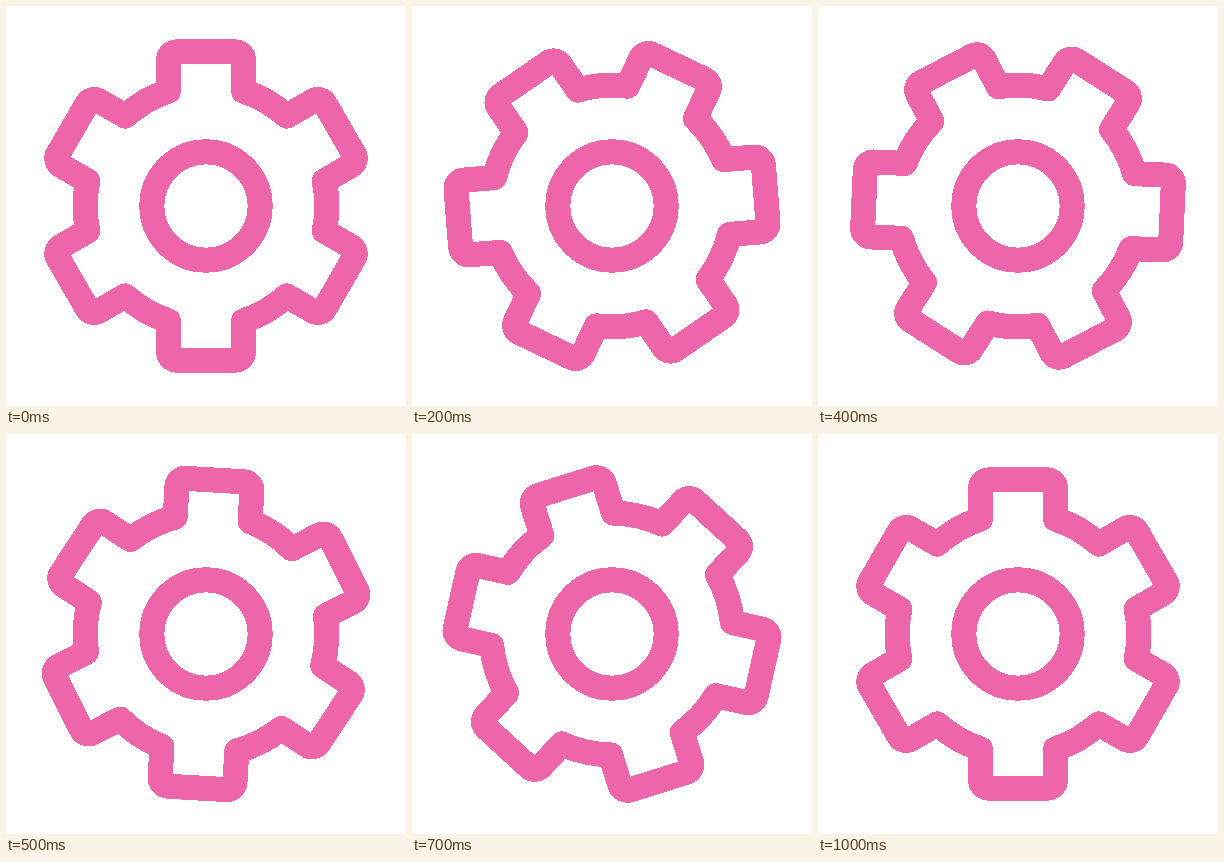
These frames come from a looping animation (400x400 px, 1.02 s). An HTML page:

```html
<!DOCTYPE html>
<html lang="en">
<head>
<meta charset="utf-8">
<title>Turning gear</title>
<style>
  html, body { margin: 0; height: 100%; overflow: hidden; background: #fff; }
  svg { display: block; width: 100vw; height: 100vh; }
</style>
</head>
<body>
<svg viewBox="-12 -12 24 24" fill="none" stroke="#ee66aa" stroke-width="1.5"
     stroke-linejoin="round" shape-rendering="crispEdges">
  <circle r="3.25"/>
  <path id="gear"/>
</svg>
<script>
const TEETH = 6, RING = 7.25, TIP = 9.25, HALF = 2.25, ROUND = 0.5;
const LOOP = 1020, STEPS = 40, TURN = 180;
const gear = document.getElementById('gear');

function gearPath() {
  const base = Math.sqrt(RING ** 2 - HALF ** 2);
  let d = '';
  for (let i = 0; i < TEETH; i++) {
    const a = i * 2 * Math.PI / TEETH, c = Math.cos(a), s = Math.sin(a);
    const at = (x, y) => `${x * c - y * s} ${x * s + y * c}`;
    const arc = (r, x, y) => `A${r} ${r} 0 0 1 ${at(x, y)}`;
    d += (i ? arc(RING, -HALF, -base) : 'M' + at(-HALF, -base))
      + 'L' + at(-HALF, ROUND - TIP) + arc(ROUND, ROUND - HALF, -TIP)
      + 'L' + at(HALF - ROUND, -TIP) + arc(ROUND, HALF, ROUND - TIP)
      + 'L' + at(HALF, -base);
  }
  return d + `A${RING} ${RING} 0 0 1 ${-HALF} ${-base}Z`;
}

// Cubic Bezier easing (1/3, 0, 0.38, 1), solved by bisection
function ease(x) {
  let lo = 0, hi = 1;
  for (let i = 0; i < 30; i++) {
    const s = (lo + hi) / 2, r = 1 - s;
    if (r * r * s + 1.14 * r * s * s + s ** 3 < x) lo = s; else hi = s;
  }
  return lo * lo * (3 - 2 * lo);
}

// 40 steps a second, held for 20 and 30 ms in turn
function draw(now) {
  const t = now % LOOP;
  const step = 2 * Math.floor(t / 50) + (t % 50 >= 20);
  gear.setAttribute('transform', `rotate(${TURN * ease(step / STEPS)})`);
}

function tick() {
  draw(performance.now() - start);
  requestAnimationFrame(tick);
}

gear.setAttribute('d', gearPath());
const start = performance.now();
tick();
</script>
</body>
</html>
```
